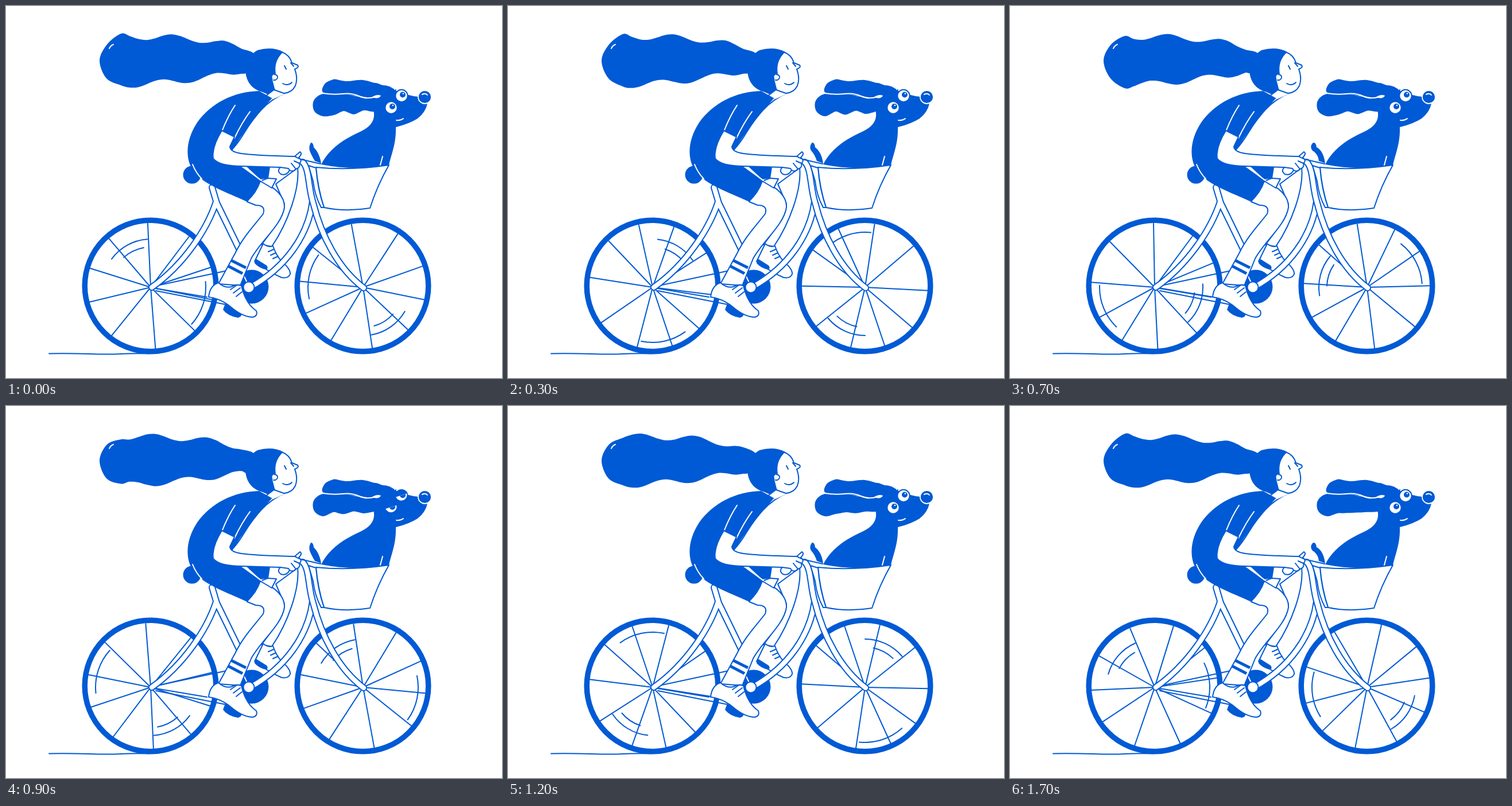
These frames come from a looping animation (864x648 px, 1800 ms). An HTML page:

```html
<!DOCTYPE html>
<html lang="en">
<head>
<meta charset="utf-8">
<title>Bike ride</title>
<style>
  html, body { margin: 0; width: 100%; height: 100%; overflow: hidden; background: #fff; }
  svg { display: block; width: 100vw; height: 100vh; }
  .line { fill: none; stroke: #005ad5; stroke-width: 2; }
  .skin { fill: #fff; stroke: #005ad5; stroke-width: 2; }
  .ink { fill: #005ad5; }
  .light { fill: none; stroke: #fff; stroke-width: 2; }
  .paper { fill: #fff; }
  .outer { fill: none; stroke: #005ad5; stroke-width: 12; }
  .inner { fill: none; stroke: #fff; stroke-width: 8; }
  .rim { stroke-width: 9.5; }
  .stripe { stroke-width: 5; stroke-linecap: butt; }
</style>
</head>
<body>
<svg viewBox="0 0 864 648" stroke-linecap="round" stroke-linejoin="round">
  <defs>
    <path id="rearFrame" d="M366 341C350 390 309 451 254 490M359 316L367 343L407 425"/>
    <path id="loopFrame" d="M534 341C526 400 487 456 425 490"/>
    <path id="fork" d="M517 272C529 284 526 315 535 343C549 400 579 458 623 491"/>
  </defs>

  <path class="line" d="M75 605.500Q110 605 145 606T200 606T250 605.500"/>

  <!-- far leg -->
  <path class="skin" d="M508 282C512 318 491 378 463 419L445 416C464 391 478 372 485 345L470 310Z"/>
  <path class="skin" d="M448 414Q456 421 465 418Q470 433 480 445Q496 458 495 467Q492 475 480 473Q459 464 433 445Z"/>
  <path class="line" d="M457 428L466 424M461 434L470 430M465 440L474 436"/>
  <path class="ink" d="M435 440L454 452Q458 457 453 459Q441 457 433 448Z"/>

  <g id="rear"></g>
  <g id="front"></g>
  <path class="line" d="M254 489L385 461M255 491L350 507M261 496L383 520"/>

  <!-- frame -->
  <circle class="ink" cx="324" cy="294" r="15.500"/>
  <use href="#rearFrame" class="outer"/><use href="#rearFrame" class="inner"/>
  <circle class="ink" cx="428" cy="489" r="29.500"/>
  <path class="light" stroke-width="6" d="M413 467L422 486"/>
  <use href="#loopFrame" class="outer"/><use href="#loopFrame" class="inner"/>
  <use href="#fork" class="outer"/><use href="#fork" class="inner"/>
  <circle class="skin" cx="423" cy="490" r="9.500"/>

  <!-- dog -->
  <path id="tail" class="ink"/>
  <path class="ink" d="M549 276C563 248 590 231 617 219Q643 207 641 187L638 165L652 138Q669 137 678 147Q698 156 718 158L734 170Q731 185 717 196Q703 205 679 211C680 240 671 258 667 277Q610 288 549 276Z"/>
  <path id="ears" class="ink"/>
  <path class="light" d="M552 152Q570 155 586 153T615 157T644 158"/>
  <path class="paper" d="M637 159Q646 153 653 156Q650 163 637 159Z"/>
  <circle class="ink" cx="729.500" cy="158.500" r="11.500" stroke="#fff" stroke-width="1.800"/>
  <path class="light" d="M725 154Q731 151 734 155M680 199Q687 200 692 196M656 262L652 277"/>
  <path class="line" d="M671 149L675 145M675 151L679 146"/>
  <g id="eyes"></g>

  <!-- basket and head tube -->
  <path class="skin" d="M540 281Q600 287 667 277Q647 312 634 352Q592 359 554 351Q543 317 540 281Z"/>
  <path class="skin" d="M527 278L540 282Q543 320 554 351L549 351Q538 331 535 305Z"/>
  <path class="line" d="M509 266L548 275"/>

  <!-- near leg -->
  <path class="ink" d="M382 518L378 529Q386 540 404 543Q412 541 410 534Z"/>
  <path class="skin" d="M420 341L443 305C468 315 486 331 485 351C480 382 444 409 427 440L408 487L370 484L399 431C414 400 437 377 448 362Q453 347 435 347Z"/>
  <path class="line stripe" d="M392 443L418 456M387 453L412 466"/>
  <path class="skin" d="M370 482Q355 487 353 507Q376 510 395 527Q414 542 430 542Q439 540 436 531Q417 518 410 487Q400 484 393 489Q381 492 370 482Z"/>
  <path class="line" d="M391 494L401 487M396 500L408 491M401 506L411 498"/>

  <!-- body -->
  <path class="skin" d="M456 300L471 301L463 317L443 305Z"/>
  <path class="ink" d="M418 279L460 281L457 300L443 302Z"/>
  <path class="ink" d="M441 148C397 149 357 169 333 203C312 235 312 268 327 288C345 312 386 325 420 341Q437 326 444 305L412 279L375 265L393 253Q423 204 464 160Z"/>
  <path class="light" d="M325 276Q331 291 341 301M409 278L445 304M399 173Q387 191 377 216M425 184Q411 203 398 230"/>
  <path class="skin" d="M376 217L398 228L390 245Q390 254 410 257C440 261 474 261 503 262L512 254Q517 257 510 264Q517 269 511 274Q513 282 505 284Q500 290 494 286Q489 296 479 293Q471 287 478 281L410 279Q372 279 361 266Q358 246 376 217Z"/>
  <path class="line" d="M478 281L492 283L494 286M497 274L505 284M502 270L511 274M503 262L511 266"/>
  <path class="line" d="M488 151C452 165 431 195 415 221Q405 238 393 251"/>

  <!-- head -->
  <path class="paper" d="M452 140L441 148L466 162L490 151Z"/>
  <path class="skin" d="M480 80Q494 85 498 99L508 103Q511 107 503 110Q509 126 504 139Q498 151 484 152L464 145L460 100Z"/>
  <path id="hair" class="ink"/>
  <path class="ink" d="M483 80Q464 70 438 77Q417 89 417 114Q420 143 447 150L456 154L468 144L464 128L470 118Q466 96 483 80Z"/>
  <circle class="paper" cx="469" cy="124" r="5.500"/>
  <path class="line" d="M467 119Q474 120 473 125Q471 130 466 129M485 104L488 110M496 99L501 105M482 135Q491 140 498 133M468 145L452 157"/>
  <path class="light" d="M180 74Q182 69 187 67"/>
</svg>

<script>
const STEP = 100, STEPS = 18, HOLD = 3;
const TAU = 2 * Math.PI;
const $ = id => document.getElementById(id);
const cosDeg = deg => Math.cos(deg * TAU / 360);
const polar = (r, deg) => [r * cosDeg(deg), r * cosDeg(deg - 90)].map(v => v.toFixed(2));
const range = (from, to, step) =>
  Array.from({length: Math.floor((to - from) / step) + 1}, (_, i) => from + i * step);

// Closed smooth curve through the points.
function smooth(points) {
  const n = points.length, at = i => points[(i + n) % n];
  return 'M' + points[0] + points.map((b, i) => {
    const a = at(i - 1), c = at(i + 1), d = at(i + 2);
    const c1 = b.map((v, k) => v + (c[k] - a[k]) / 6);
    const c2 = c.map((v, k) => v - (d[k] - b[k]) / 6);
    return `C${c1} ${c2} ${c}`;
  }).join('') + 'Z';
}

// Both wheels share one drawing with ten unevenly spaced spokes.
const spokeAngle = i => 36 * i - 56 + 5 * cosDeg(72 * i - 36) - 3 * cosDeg(36 * i - 72);
const spokes = range(0, 9, 1).map(i => `M0 0L${polar(111, spokeAngle(i))}`).join('');
const arc = (r, mid, half) => `M${polar(r, mid - half)}A${r} ${r} 0 0 1 ${polar(r, mid + half)}`;
const marks = arc(84, -119, 25) + arc(70, -116, 16) + arc(96, 18, 24);

function makeWheel(id, x) {
  $(id).innerHTML = `<circle class="line rim" cx="${x - 0.5}" cy="487.5" r="114.3"/>
    <path class="line" d="${spokes + marks}"/>`;
  const inside = $(id).lastElementChild;
  return deg => inside.setAttribute('transform', `translate(${x} 490) rotate(${deg})`);
}
const turnRear = makeWheel('rear', 252);
const turnFront = makeWheel('front', 622);

// Bulges run along the hair away from the head and fade out at the tie.
function hairPath(pose) {
  const wave = (x, crest, shift) =>
    Math.min(1, (430 - x) / 45) * Math.cos(TAU * ((x - crest) / 95 + shift));
  const topShift = (pose / 5) ** 2, lowShift = Math.min(1, (pose / 4) ** 2);
  const top = x => 53.5 + 28 * ((x - 165) / 265) ** 4 - 5.5 * wave(x, 385, topShift);
  const low = x => 138 - 24 * ((x - 190) / 230) ** 1.6 + 5.5 * wave(x, 318, lowShift);
  const xs = range(200, 410, 15);
  return smooth([
    [436, 100], [431, 82], ...xs.map(x => [x, top(x)]).reverse(),
    [176, 67], [163, 95], [175, 126], ...xs.map(x => [x, low(x)]), [420, 116]
  ]);
}

// The ears flap between two opposite ripples and calm down.
function earPath(pose) {
  const calm = 1 - (pose / 5) ** 2;
  const top = x => 129.5 + 1.5 * Math.cos((x - 595) / 8) + 5 * ((x - 570) / 80) ** 4;
  const low = x => 187 - (x - 570) / 25 + 3.2 * calm * Math.cos(Math.PI * ((x - 570) / 18 + pose));
  return smooth([[553, 151], [555, 136], ...range(570, 650, 10).map(x => [x, top(x)]),
      [672, 147], [650, 160], [615, 157], [586, 153]]) +
    smooth([[536, 165], [552, 153], [585, 153], [615, 158], [645, 160], [648, 180], [640, 184],
      ...range(570, 624, 9).map(x => [x, low(x)]).reverse(), [552, 192], [537, 183]]);
}

const tailPath = curl => `M${531 - 1.5 * curl} 238Q${535 - curl} 237 ${536 - curl} 246
  Q546 ${256 - 2 * curl} 549 274L538 270Q${531 + 3 * curl} 258 ${529 - curl} 252
  Q${527 - 3 * curl} 245 ${531 - 1.5 * curl} 238Z`;

const openEye = `<circle class="skin" r="10.7"/><circle class="ink" cx="2" cy="-2" r="5"/>
  <circle class="paper" cx="3" cy="-4" r="1.3"/>`;
const sleepyEye = `<circle class="ink" r="11.5"/><path class="paper" d="M-9.7 2L9.3 -4A10 10 0 0 1 -9.7 2Z"/>
  <path class="ink" d="M-3 0L7 -3A5 5 0 0 1 -3 0Z"/>`;

function setPose(pose) {
  const eye = pose === 3 ? sleepyEye : openEye;
  $('hair').setAttribute('d', hairPath(pose));
  $('ears').setAttribute('d', earPath(pose));
  $('tail').setAttribute('d', tailPath(pose % 3));
  $('eyes').innerHTML = `<g transform="translate(689 156.5)">${eye}</g><g transform="translate(671 177)">${eye}</g>`;
}

function draw() {
  const n = Math.floor(performance.now() / STEP) % STEPS;
  const turn = n * 360 / STEPS;
  turnRear(turn);
  turnFront(turn + 174);
  setPose(Math.floor(n / HOLD));
  requestAnimationFrame(draw);
}
draw();
</script>
</body>
</html>
```
